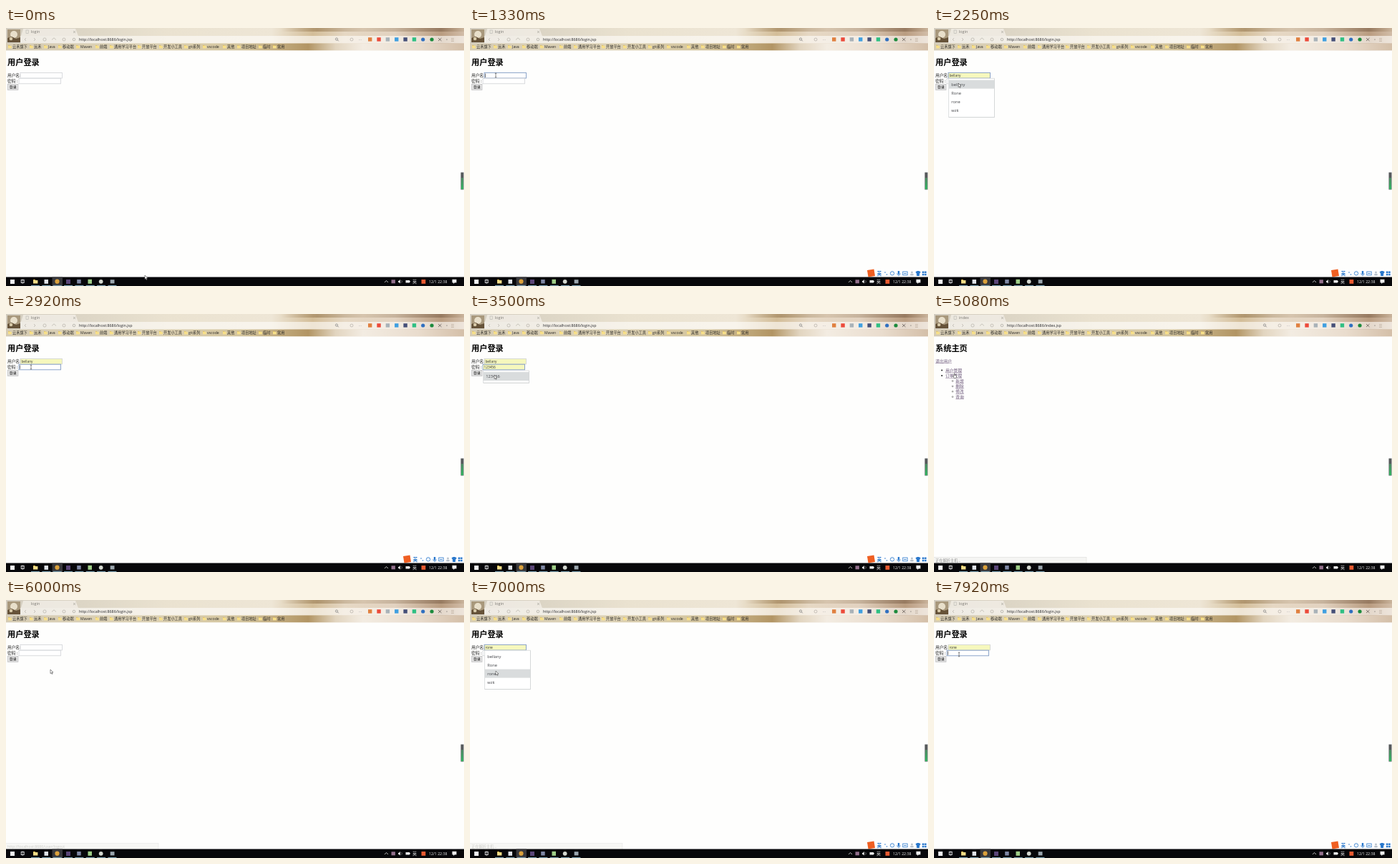
An HTML page with a canvas that plays this animation: 640 by 360 pixels, repeating every 8 s.

```html
<!DOCTYPE html>
<html lang="zh-CN">
<head>
<meta charset="utf-8">
<title>login</title>
<style>
html, body { margin: 0; width: 100%; height: 100%; overflow: hidden; background: #fefefd; }
canvas { display: block; width: 100vw; height: 100vh; }
</style>
</head>
<body>
<canvas id="stage"></canvas>
<script>
const W = 640, H = 360, LOOP = 8000, STEP = 1000 / 12;
const FONT = '"Open Sans", "Noto Sans CJK SC", "Noto Sans CJK", sans-serif';
const PAGE = '#fefefd', FILL = '#f6f8bd', HOVER = '#d9dcdd';
const canvas = document.getElementById('stage');
const ctx = canvas.getContext('2d');

const USERS = ['bellany', 'Rone', 'rone', 'wzk'];
const BOOKMARKS = [
  [3, '云禾旗下'], [33, '远禾'], [53, 'Java'], [73, '移动端'], [98, 'Maven'],
  [125, '前端'], [145, '通用学习平台'], [184, '开放平台'], [214, '开发小工具'],
  [249, 'git系列'], [275, 'vscode'], [303, '其他'], [323, '项目地址'],
  [353, '临时'], [373, '常用']
];

// Pointer path: time, x, y
const PATH = [
  [0, 194, 345], [170, 194, 345], [920, 62, 88], [1250, 36, 66], [1670, 36, 66],
  [2000, 34, 77], [2420, 34, 77], [2750, 35, 74], [3080, 35, 74], [3330, 34, 85],
  [3670, 34, 85], [4080, 11, 82], [4420, 11, 82], [4920, 28, 83], [5080, 28, 83],
  [5420, 14, 66], [5580, 14, 66], [5830, 62, 97], [6000, 62, 97], [6400, 37, 66],
  [6670, 37, 66], [6920, 36, 99], [7250, 36, 99], [7580, 35, 76], [8000, 35, 76]
];

const within = (t, a, b) => t >= a && t < b;

function rect(x, y, w, h, color) {
  ctx.fillStyle = color;
  ctx.fillRect(x, y, w, h);
}

function frame(x, y, w, h, color, width = 0.7) {
  ctx.strokeStyle = color;
  ctx.lineWidth = width;
  ctx.strokeRect(x, y, w, h);
}

function text(s, x, y, size, color = '#222', weight = 400) {
  ctx.font = `${weight} ${size}px ${FONT}`;
  ctx.fillStyle = color;
  ctx.fillText(s, x, y);
  return ctx.measureText(s).width;
}

function dot(x, y, r, color) {
  ctx.fillStyle = color;
  ctx.beginPath();
  ctx.arc(x, y, r, 0, 7);
  ctx.fill();
}

function ring(x, y, r, color, width = 0.7) {
  ctx.strokeStyle = color;
  ctx.lineWidth = width;
  ctx.beginPath();
  ctx.arc(x, y, r, 0, 7);
  ctx.stroke();
}

function line(points, color, width = 0.7) {
  ctx.strokeStyle = color;
  ctx.lineWidth = width;
  ctx.beginPath();
  points.forEach(([x, y]) => ctx.lineTo(x, y));
  ctx.stroke();
}

function shape(points, color) {
  ctx.fillStyle = color;
  ctx.beginPath();
  points.forEach(([x, y]) => ctx.lineTo(x, y));
  ctx.closePath();
  ctx.fill();
}

function gradient(x0, y0, x1, y1, stops) {
  const g = ctx.createLinearGradient(x0, y0, x1, y1);
  stops.forEach(([at, color]) => g.addColorStop(at, color));
  return g;
}

function themeBackground() {
  rect(0, 0, W, 31.2, gradient(0, 0, W, 0, [
    [0, '#d2ccbf'], [0.16, '#dcd5c5'], [0.35, '#eae2d0'], [0.58, '#eee6d6'],
    [0.67, '#d3bd98'], [0.74, '#e6d8c4'], [0.85, '#e2d2c0'], [0.95, '#b99c80'], [1, '#d2bda8']
  ]));
  rect(0, 0, W, 5, gradient(0, 0, W, 0, [
    [0.6, 'rgba(130,98,56,0)'], [0.68, 'rgba(130,98,56,.45)'],
    [0.78, 'rgba(130,98,56,.15)'], [0.95, 'rgba(100,72,50,.4)'], [1, 'rgba(130,98,56,.1)']
  ]));
  rect(20, 11, 620, 10.5, 'rgba(255,254,250,.62)');
  rect(0, 21.5, W, 9.7, gradient(0, 0, W, 0, [
    [0, '#d6ccb4'], [0.3, '#ddd2b6'], [0.52, '#d3c49d'], [0.66, '#b29564'],
    [0.72, '#e2d5c0'], [0.78, '#f3ece2'], [0.9, '#e9dccd'], [1, '#d4bfa8']
  ]));
}

function browserBar(title, url, loading) {
  themeBackground();
  shape([[21, 11], [24, 1], [97, 1], [101, 11]], 'rgba(244,241,234,.75)');

  rect(2, 2, 18, 18, '#a8987c');
  dot(11, 9, 5, '#e8dfca');
  shape([[2, 20], [2, 14], [8, 12], [14, 15], [20, 13], [20, 20]], '#665339');
  dot(7, 15, 2.3, '#d7c9a8');

  if (!loading) frame(28, 3, 3.2, 4.4, '#b5b4b0', 0.6);
  text(title, 35, 7.4, 5.4, '#77756f');
  line([[94, 4], [97, 7]], '#98958c', 0.6);
  line([[97, 4], [94, 7]], '#98958c', 0.6);

  const ink = '#b5b1a8';
  line([[28, 14], [26, 16], [28, 18]], ink);
  line([[39, 14], [41, 16], [39, 18]], ink);
  ring(54, 16, 2.1, ink);
  line([[64, 16.5], [67, 13.8], [70, 16.5]], ink);
  ring(81, 16, 2, ink);
  ring(95, 16, 1.8, '#8b8880', 0.5);
  text(url, 102, 18, 5.35, '#26262a');

  ring(462, 15.5, 1.6, '#66666a', 0.6);
  line([[463.2, 16.7], [464.8, 18.3]], '#66666a');
  ring(483, 16, 2, '#a8a39c', 0.6);
  text('…', 493, 16.8, 5, '#999');
  const icons = ['#e0803f', '#ec4a3a', '#a9b2b8', '#3f9fe0', '#454f78', '#2fbf83', '#2f6fc0', '#1c8a3c'];
  icons.forEach((color, i) => {
    const x = 506 + i * 12.35;
    if (i > 5) dot(x + 2.6, 16, 2.6, color);
    else rect(x, 13.2, 5.4, 5.4, color);
  });
  line([[604, 14], [608.5, 18]], '#554e4a');
  line([[608.5, 14], [604, 18]], '#554e4a');
  dot(616, 16, 0.6, '#554e4a');
  [14, 16, 18].forEach(y => rect(622, y, 4, 0.6, '#b5a595'));

  BOOKMARKS.forEach(([x, name]) => {
    rect(x, 24.2, 2.3, 1, '#e3c04c');
    rect(x, 24.9, 4.8, 3.4, '#f8e08a');
    text(name, x + 6, 28.3, 5.2, '#2c2a26');
  });
}

function field(x, y, value, filled, focused) {
  rect(x, y, 58.5, 7.6, filled ? FILL : '#fff');
  frame(x, y, 58.5, 7.6, focused ? '#7f9ac4' : '#c9ccd0', focused ? 0.9 : 0.7);
  text(value, x + 1.4, y + 5.6, 4.8, '#333');
}

function menu(x, y, h, items, hover, first) {
  rect(x + 0.6, y + 0.8, 64, h, 'rgba(80,84,90,.18)');
  rect(x, y, 64, h, '#fff');
  frame(x, y, 64, h, '#c8cbce', 0.6);
  items.forEach((name, i) => {
    const mid = first + i * 12;
    if (i === hover) rect(x + 0.3, mid - 6, 63.4, 12, HOVER);
    text(name, x + 4, mid + 2, 5.7, '#404246');
  });
}

function caret(x, y, t) {
  if (t % 1000 < 500) rect(x, y, 0.6, 5.4, '#222');
}

function loginPage(t) {
  const second = t >= 5750;
  const userMenu = within(t, 1580, 2420) || within(t, 6580, 7250);
  const passMenu = within(t, 3000, 3670);
  const hover = second ? 2 : 0;
  const onItem = within(t, 1920, 2420) || within(t, 6830, 7250);
  const chosen = within(t, 2420, 4420) || t >= 7250;
  const userFocus = within(t, 1330, 2830) || within(t, 6420, 7670);
  const passFocus = within(t, 2830, 4250) || t >= 7670;
  const passHover = within(t, 3250, 3670);
  const passFilled = within(t, 3250, 4420);

  text('用户登录', 2, 51.8, 11.2, '#000', 700);
  text('用户名:', 2, 68, 5.7, '#222');
  text('密码 :', 2, 76, 5.7, '#222');
  field(20, 62.4, onItem || chosen ? USERS[hover] : '', onItem || chosen, userFocus);
  field(18, 70.2, passFilled ? '123456' : '', passFilled, passFocus);
  rect(2.3, 78.5, 14.6, 7.8, '#e4e4e4');
  frame(2.3, 78.5, 14.6, 7.8, '#b9b9bb', 0.7);
  text('登录', 4.7, 84.4, 5, '#111');
  if (userFocus && !onItem && !chosen) caret(21.4, 63.6, t);
  if (passFocus && !passFilled) caret(19.4, 71.4, t + 330);
  if (userMenu) menu(20.3, 70.2, 54.1, USERS, onItem ? hover : -1, 78.6);
  if (passMenu) menu(18.3, 79, 17, ['123456'], passHover ? 0 : -1, 87);
}

function link(s, x, y) {
  const w = text(s, x, y, 5.75, '#6a5678');
  rect(x, y + 0.9, w, 0.5, '#85718f');
}

function indexPage() {
  text('系统主页', 2, 51.8, 11.2, '#000', 700);
  link('退出用户', 2, 67.6);
  ['用户管理', '订单管理'].forEach((s, i) => {
    dot(11, 78.6 + i * 7.5, 1, '#222');
    link(s, 16, 80.6 + i * 7.5);
  });
  ['新增', '删除', '修改', '查询'].forEach((s, i) => {
    ring(26, 93.5 + i * 7.35, 0.9, '#444', 0.5);
    link(s, 30.3, 95.5 + i * 7.35);
  });
}

function statusBar(t) {
  if (!within(t, 4330, 7330)) return;
  const url = within(t, 5330, 6420);
  ctx.globalAlpha = t < 5750 ? 1 : 0.7;
  rect(0, 339.5, 213, 8, '#f5f5f3');
  frame(-1, 339.5, 214, 9, '#dcdcda', 0.6);
  text(url ? 'http://localhost:8686/user/logout' : '正在解析主机…', 2, 345.5, 5.2, t < 5330 ? '#929292' : '#bcbcb8');
  ctx.globalAlpha = 1;
}

function inputBar() {
  const blue = '#2a78cc';
  rect(562, 337, 78, 10.5, '#fff');
  ctx.save();
  ctx.translate(560.5, 342);
  ctx.rotate(-0.16);
  rect(-4.8, -4.8, 9.6, 9.6, '#ef5f22');
  ctx.restore();
  text('英', 568.8, 344.8, 6.4, blue, 700);
  dot(580, 341, 0.8, blue);
  dot(582.5, 344, 0.8, blue);
  ring(590, 342.3, 2.7, blue, 0.8);
  dot(589, 341.6, 0.4, blue);
  dot(591, 341.6, 0.4, blue);
  rect(597.8, 339, 2.4, 4.5, blue);
  line([[596.8, 342], [597.2, 344.4], [600.8, 344.4], [601.2, 342]], blue, 0.6);
  rect(598.7, 344.2, 0.7, 2, blue);
  frame(604.8, 340, 6.4, 4.8, blue, 0.8);
  rect(606, 342, 4, 0.8, blue);
  dot(617.5, 341, 1.5, '#b9c2cc');
  rect(615.3, 343, 4.4, 2.4, '#b9c2cc');
  shape([[622.5, 340.5], [624.8, 339], [627.5, 339], [629.8, 340.5], [628.3, 342.4], [628, 346], [624.2, 346], [624, 342.4]], blue);
  [[632, 339.5], [635.2, 339.5], [632, 342.8], [635.2, 342.8]].forEach(([x, y]) => rect(x, y, 2.5, 2.5, blue));
}

function taskbar() {
  rect(0, 347.5, W, 12.5, '#07070a');
  rect(64.5, 347.5, 14.5, 12.5, '#38383c');
  rect(6, 351, 6, 6, '#f4f4f6');
  frame(21.2, 351.5, 4, 4, '#e4e4e6', 0.9);
  line([[23.2, 350.5], [23.2, 357]], '#e4e4e6', 0.6);
  rect(38, 351, 3, 1.4, '#e3b94b');
  rect(38, 352, 6.4, 4.5, '#f4dd88');
  rect(53.5, 351, 5.5, 5.8, '#dfe3e8');
  dot(71.5, 353.7, 3.1, '#dba13c');
  rect(84, 351, 6, 6, '#5a4678');
  rect(99.2, 351, 5.5, 5.5, '#7f88a4');
  rect(114.5, 350.8, 5.5, 6, '#9fce88');
  dot(132.7, 353.8, 2.9, '#d4d8d0');
  rect(145.7, 351.2, 5.8, 5.2, '#9ba6ae');
  for (let i = 0; i < 8; i++) rect(35 + i * 15.35, 358.9, 12, 1.1, '#7ea3b4');

  line([[529, 355], [531.5, 352.4], [534, 355]], '#ddd', 0.8);
  rect(538.5, 351.3, 5.4, 5, '#93708c');
  shape([[548, 352.7], [549.2, 352.7], [551, 351], [551, 356.6], [549.2, 355], [548, 355]], '#ddd');
  line([[552.5, 352], [553.4, 353.8], [552.5, 355.7]], '#aaa', 0.6);
  rect(558.5, 352, 5.5, 3.5, '#eee');
  rect(564, 353, 0.8, 1.5, '#eee');
  text('英', 568, 356.1, 6, '#eee');
  rect(580.5, 351, 5.8, 5.8, '#e95a30');
  text('12/1 22:38', 591, 355.8, 5.2, '#eee');
  rect(623.5, 350.8, 6, 4.6, '#eee');
  shape([[625, 355], [627, 355], [625.5, 357]], '#eee');
}

function sideMeter() {
  rect(635.5, 201.5, 4, 24, '#55585a');
  rect(636, 209, 3, 16, gradient(0, 209, 0, 225, [[0, '#4f8662'], [1, '#2fb45e']]));
}

function pointerAt(t) {
  const i = PATH.findIndex(p => p[0] > t);
  const [t0, x0, y0] = PATH[i - 1], [t1, x1, y1] = PATH[i];
  const k = (t - t0) / (t1 - t0), e = k * k * (3 - 2 * k);
  return [x0 + (x1 - x0) * e, y0 + (y1 - y0) * e];
}

function pointer(t) {
  const [x, y] = pointerAt(t);
  const index = within(t, 4420, 5750);
  const menuOpen = within(t, 1580, 2420) || within(t, 3000, 3670) || within(t, 6580, 7250);
  const overField = !index && x > 18 && x < 78 && y > 62 && y < 78;
  const overLink = index && ((x < 25 && y > 62 && y < 69) || (x > 16 && x < 41 && y > 75 && y < 90));
  ctx.save();
  ctx.translate(x, y);
  if (overField && (!menuOpen || y < 70)) {
    line([[-1.2, -2.8], [1.2, -2.8]], '#333', 0.6);
    line([[0, -2.8], [0, 2.8]], '#333', 0.6);
    line([[-1.2, 2.8], [1.2, 2.8]], '#333', 0.6);
  } else {
    const arrow = [[0, 0], [0, 5.6], [1.3, 4.4], [2.2, 6.4], [3.1, 6], [2.3, 4], [4, 4]];
    const hand = [[0, 0], [0.9, 0], [0.9, 2.4], [3.5, 3], [3.5, 5], [2.8, 6.5], [0, 6.5], [-1.8, 3.8], [-1, 3.5], [0, 4.2]];
    const p = overLink ? hand : arrow;
    shape(p, '#fff');
    line([...p, p[0]], '#444', 0.6);
  }
  ctx.restore();
}

function draw(t) {
  const index = within(t, 4420, 5750);
  const name = index ? 'index' : 'login';
  rect(0, 0, W, H, PAGE);
  browserBar(name, `http://localhost:8686/${name}.jsp`, within(t, 5750, 6200));
  if (index) indexPage();
  else loginPage(t);
  statusBar(t);
  sideMeter();
  if (within(t, 1330, 4330) || t >= 6420) inputBar();
  taskbar();
  pointer(t);
}

function resize() {
  canvas.width = Math.round(innerWidth * devicePixelRatio);
  canvas.height = Math.round(innerHeight * devicePixelRatio);
}

let start;
function tick(now) {
  start ??= now;
  const t = (now - start) % LOOP;
  ctx.setTransform(canvas.width / W, 0, 0, canvas.height / H, 0, 0);
  draw(Math.floor((t + 4) / STEP) * STEP % LOOP);
  requestAnimationFrame(tick);
}

addEventListener('resize', resize);
resize();
requestAnimationFrame(tick);
</script>
</body>
</html>
```
